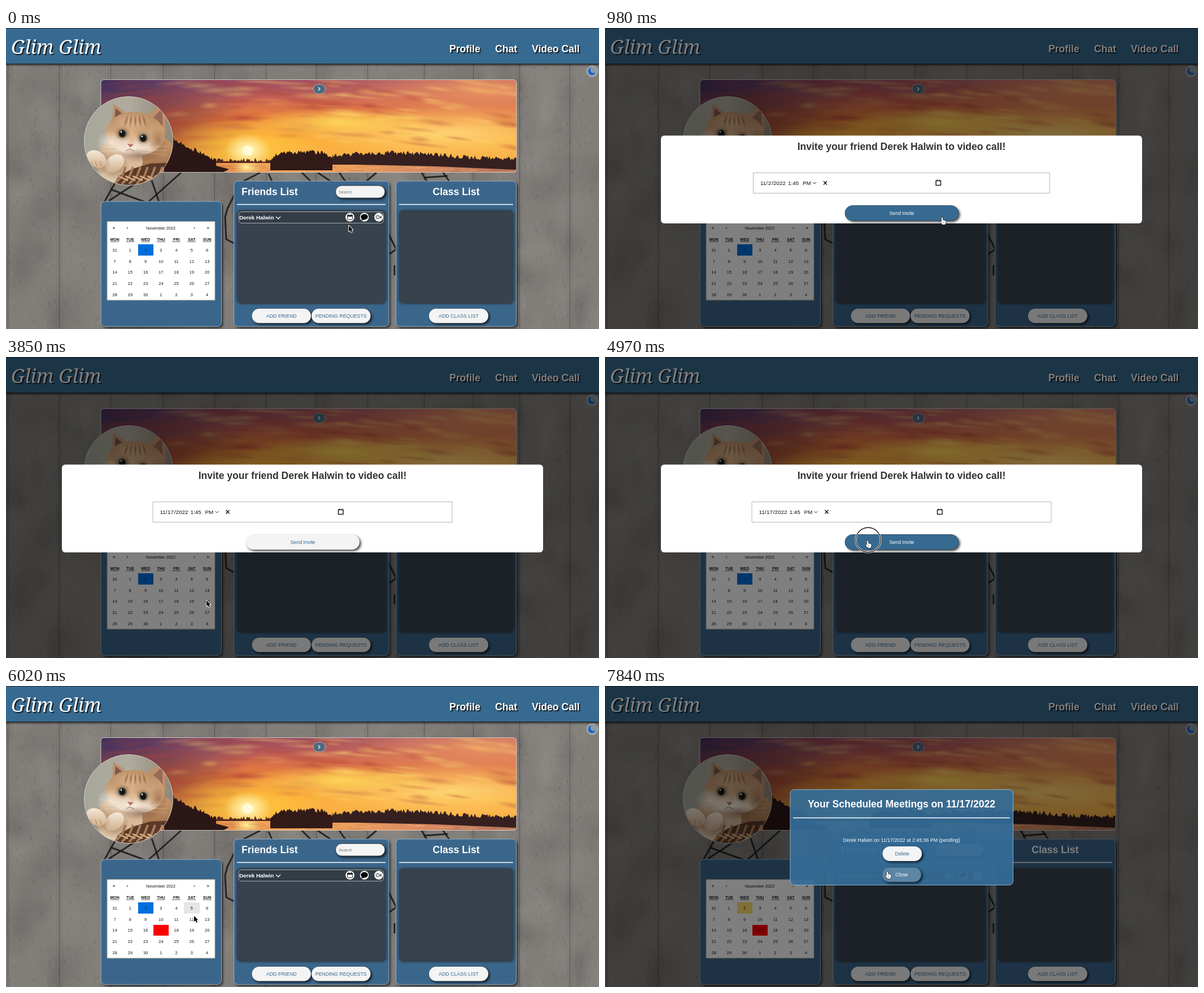
Recreate the animation shown at these times as an HTML page with a canvas. Size 1050 px wide and 533 px high, loop 7910 ms.

```html
<!DOCTYPE html>
<html lang="en">
<head>
<meta charset="utf-8">
<title>Glim Glim</title>
<style>
html, body { margin: 0; width: 100%; height: 100%; overflow: hidden; background: #777; }
canvas { display: block; }
</style>
</head>
<body>
<canvas id="stage" width="1050" height="533"></canvas>
<script>
const W = 1050, H = 533, LOOP = 7910, FRIEND = 'Derek Halwin';
const BLUE = '#376a90', PALE = '#f4f4f4', DARK = '#37424c';
const screen = document.getElementById('stage').getContext('2d');
const page = document.createElement('canvas');
page.width = W;
page.height = H;
let c = page.getContext('2d');

let seed = 11;
const rnd = (a = 0, b = 1) => a + (b - a) * (seed = seed * 16807 % 2147483647) / 2147483647;
const clamp = v => Math.max(0, Math.min(1, v));
const smooth = v => (v = clamp(v), v * v * (3 - 2 * v));
const within = (t, a, b) => t >= a && t < b;

function text(str, x, y, size, color, align = 'center', bold = false) {
  c.font = `${bold ? 'bold ' : ''}${size}px "Liberation Sans", Arial, sans-serif`;
  c.textAlign = align;
  c.fillStyle = color;
  c.fillText(str, x, y);
}
function shadow(color = 'transparent', d = 0, blur = 0) {
  c.shadowColor = color;
  c.shadowOffsetX = c.shadowOffsetY = d;
  c.shadowBlur = blur;
}
function box(x, y, w, h, r, fill, stroke, drop) {
  c.beginPath();
  c.roundRect(x, y, w, h, r);
  if (drop) shadow('rgba(0,0,0,.75)', 2.5, 4);
  c.fillStyle = fill;
  c.fill();
  shadow();
  if (stroke) {
    c.strokeStyle = stroke;
    c.lineWidth = 1;
    c.stroke();
  }
}
function shape(points, fill) {
  c.beginPath();
  for (let i = 0; i < points.length; i += 2) c.lineTo(points[i], points[i + 1]);
  c.closePath();
  c.fillStyle = fill;
  c.fill();
}
function line(points, color, width = 1) {
  c.beginPath();
  for (let i = 0; i < points.length; i += 2) c.lineTo(points[i], points[i + 1]);
  c.strokeStyle = color;
  c.lineWidth = width;
  c.stroke();
}
function oval(x, y, rx, ry, fill, angle = 0) {
  c.beginPath();
  c.ellipse(x, y, rx, ry, angle, 0, 7);
  c.fillStyle = fill;
  c.fill();
}
function gradient(x0, y0, x1, y1, colors) {
  const g = c.createLinearGradient(x0, y0, x1, y1);
  colors.forEach((col, i) => g.addColorStop(i / (colors.length - 1), col));
  return g;
}
function glow(x, y, rx, ry, rgb, alpha, angle = 0) {
  c.save();
  c.translate(x, y);
  c.rotate(angle);
  c.scale(rx, ry);
  const g = c.createRadialGradient(0, 0, 0, 0, 0, 1);
  g.addColorStop(0, `rgba(${rgb},${alpha})`);
  g.addColorStop(1, `rgba(${rgb},0)`);
  c.fillStyle = g;
  c.fillRect(-1, -1, 2, 2);
  c.restore();
}
function pill(label, x, y, w, h, hover = 0) {
  box(x, y, w, h, h / 2, PALE, null, true);
  if (hover) {
    c.globalAlpha *= hover;
    box(x, y, w, h, h / 2, BLUE, '#2c4f6b');
    c.globalAlpha /= hover;
  }
  text(label, x + w / 2, y + h / 2 + 3, 8.8, hover > .4 ? '#fff' : BLUE);
}

function drawWall() {
  c.fillStyle = '#817e7a';
  c.fillRect(0, 0, W, H);
  for (let i = 0; i < 220; i++)
    glow(rnd(0, W), rnd(60, H), rnd(15, 60), rnd(20, 80), rnd() < .5 ? '50,47,45' : '170,167,162', .13);
  for (let i = 0; i < 5000; i++) {
    c.fillStyle = rnd() < .5 ? 'rgba(40,38,36,.09)' : 'rgba(190,186,180,.08)';
    c.fillRect(rnd(0, W), rnd(60, H), rnd(1, 3), rnd(1, 7));
  }
  for (const x of [3, 94, 185, 278, 369, 460, 549, 640, 740, 827, 909, 998]) {
    glow(x, 300, 8, 380, '30,28,26', .08);
    line([x + .5, 60, x + .5, H], 'rgba(45,42,40,.4)');
  }
  [[204, 255, 174, 308], [250, 262, 182, 306], [258, 270, 271, 308], [310, 256, 252, 308],
   [186, 286, 246, 308], [450, 256, 415, 274, 392, 320, 388, 335, 390, 374, 405, 382],
   [465, 258, 472, 274], [524, 256, 542, 274], [552, 256, 577, 273], [590, 256, 602, 273],
   [636, 273, 656, 256], [676, 362, 691, 392, 676, 402], [688, 420, 688, 438],
   [736, 256, 746, 273], [774, 256, 786, 273], [740, 265, 782, 262]
  ].forEach(p => line(p, 'rgba(24,23,23,.85)', 3));
}

function trees(x0, x1, top, base, color) {
  const points = [x0, base];
  for (let x = x0; x <= x1; x += 2) points.push(x, top((x - x0) / (x1 - x0)) + rnd(-4, 4));
  shape([...points, x1, base], color);
}
function drawSunset() {
  c.save();
  c.beginPath();
  c.roundRect(168, 91.5, 736, 164, 6);
  c.clip();
  c.fillStyle = gradient(0, 91, 0, 236, ['#a8566a', '#cf6650', '#ec8439', '#fbac3c', '#f9b24a']);
  c.fillRect(168, 91, 736, 165);
  glow(170, 95, 290, 110, '52,44,94', .95);
  glow(215, 190, 230, 85, '120,40,48', .85);
  glow(500, 92, 260, 42, '140,64,88', .5);
  glow(850, 110, 290, 62, '236,150,98', .9);
  glow(790, 185, 260, 48, '255,216,120', .9);
  for (let i = 0; i < 130; i++) {
    const x = rnd(180, 910), y = rnd(95, 212), bright = rnd() < clamp((x - 150) / 500) * .65;
    glow(x, y, rnd(15, 60), rnd(3, 8), bright ? '255,218,110' : '176,66,56', x < 330 ? .25 : .36, (x - 428) / 2600);
  }
  glow(590, 168, 180, 26, '255,222,90', .85);
  glow(428, 210, 150, 50, '255,200,60', .9);
  glow(428, 217, 42, 30, '255,253,205', 1);
  oval(428, 217, 9, 9, '#fffbd8');
  c.fillStyle = gradient(168, 0, 904, 0, ['#8a4333', '#e08b4a', '#f2a456', '#dc8d63', '#b4745c']);
  c.fillRect(168, 236, 736, 20);
  glow(426, 246, 26, 14, '255,240,150', 1);
  for (let i = 0; i < 70; i++) {
    c.fillStyle = rnd() < .5 ? 'rgba(255,205,130,.4)' : 'rgba(120,60,45,.28)';
    c.fillRect(rnd(330, 900), rnd(240, 255), rnd(8, 35), 1);
  }
  trees(355, 475, () => 234, 239, '#54291f');
  trees(578, 904, u => 226 - 5 * Math.sin(u * 5), 242, '#35201f');
  shape([578, 239, 904, 239, 904, 251, 760, 245, 578, 241], '#35201f');
  trees(468, 578, u => 220 + 14 * Math.pow(Math.abs(2 * u - 1), 6), 252, '#321a18');
  trees(280, 372, u => 188 + 47 * u, 258, '#2b1716');
  shape([350, 238, 395, 250, 380, 258, 350, 258], '#2b1716');
  c.restore();
  box(168, 91.5, 736, 164, 6, 'transparent', 'rgba(225,220,215,.8)');
}

function drawCat() {
  c.save();
  c.beginPath();
  c.arc(217, 200, 78.5, 0, 7);
  c.clip();
  c.fillStyle = gradient(138, 0, 296, 0, ['#a5a79b', '#b0ab9d', '#8f8778']);
  c.fillRect(138, 120, 160, 160);
  oval(262, 236, 42, 46, gradient(0, 195, 0, 280, ['#c99a6c', '#8a5c3c']));
  oval(200, 236, 42, 38, gradient(0, 200, 0, 275, ['#c9a27c', '#e2cdb2']));
  shape([187, 182, 190, 134, 197, 139, 224, 158], '#bd8f6a');
  shape([192, 166, 194, 142, 212, 157], '#7d5447');
  shape([244, 158, 274, 137, 281, 134, 283, 186], '#bd8f6a');
  shape([259, 160, 277, 142, 277, 174], '#966a58');
  oval(229, 187, 52, 38, gradient(0, 150, 0, 226, ['#b98a61', '#cfa67e', '#ecdcc6']), .1);
  glow(222, 165, 34, 20, '232,200,165', .6);
  glow(186, 203, 26, 22, '246,236,220', .8);
  glow(222, 212, 40, 24, '248,238,224', .95);
  glow(270, 200, 18, 24, '150,98,60', .7);
  glow(236, 225, 40, 12, '110,72,48', .55);
  for (let i = -2; i < 3; i++) glow(229 + i * 8, 164, 3, 13, '140,88,52', .8, -i * .15);
  glow(223, 190, 10, 22, '226,180,140', .9);
  for (const [x, y] of [[206, 187], [243, 195]]) {
    glow(x, y, 14, 13, '90,64,44', .7);
    oval(x, y, 7.5, 7.5, '#5e5d49');
    oval(x, y, 5.2, 6, '#151515');
    oval(x - 2, y - 3, 1.4, 1.4, '#fff');
  }
  shape([215, 205, 226, 206, 220, 212], '#b87263');
  line([213, 217, 219, 214, 227, 218], '#8d6253');
  for (let i = 0; i < 3; i++) {
    line([208, 208 + i * 4, 165, 201 + i * 9], 'rgba(255,255,255,.4)', .6);
    line([238, 212 + i * 4, 285, 209 + i * 8], 'rgba(255,255,255,.4)', .6);
  }
  shape([188, 281, 200, 262, 222, 250, 255, 240, 300, 238, 300, 281], '#5a3928');
  for (let x = 192; x < 292; x += 13) line([x, 276, x + 14, 262, x + 20, 246], '#a97d58', 4);
  for (let x = 198; x < 292; x += 13) line([x, 262, x + 18, 270], '#d3ad84', 2.5);
  for (const [x, y, angle] of [[192, 240, -.7], [160, 232, .6]]) {
    glow(x, y + 6, 27, 24, '120,84,58', .6);
    oval(x, y, 19, 14, gradient(0, y - 14, 0, y + 14, ['#f2e6d4', '#d3b290']), angle);
  }
  for (let i = 0; i < 3; i++) line([150 + i * 8, 236, 153 + i * 8, 245], '#a98562');
  c.restore();
  c.beginPath();
  c.arc(217, 200, 78.5, 0, 7);
  c.strokeStyle = 'rgba(225,220,210,.85)';
  c.lineWidth = 1;
  c.stroke();
}

function drawPanel(x, y, w, h) {
  box(x, y, w, h, 7, 'rgba(60,105,143,.97)', 'rgba(180,205,222,.75)', true);
}
function drawInset(x, w) {
  shadow('rgba(30,38,46,.9)', 0, 4);
  box(x, 323, w, 165, 8, DARK);
  shadow();
}
function drawIcons() {
  for (const x of [609, 634.5, 660]) oval(x, 335, 7.8, 7.8, '#fff');
  box(604.5, 331.5, 9, 8, 1, '#fff', '#222');
  c.fillStyle = '#222';
  c.fillRect(604, 331, 10, 3);
  line([607, 329, 607, 332], '#222');
  line([611.5, 329, 611.5, 332], '#222');
  oval(634.5, 334.5, 6.3, 5, '#000');
  shape([630, 336, 629.5, 341, 635, 339], '#000');
  box(655.5, 332.5, 5.5, 5, 1, '#fff', '#222');
  shape([662, 335, 664.5, 332, 664.5, 338], '#222');
}

function drawPage() {
  drawWall();
  shadow('rgba(0,0,0,.9)', 2, 4);
  c.fillStyle = BLUE;
  c.fillRect(-5, 0, W + 10, 63);
  shadow();
  c.fillStyle = '#222e38';
  c.fillRect(0, 0, W, 1);
  shadow('rgba(20,20,20,.9)', 2, 1);
  c.font = 'italic 34px "Noto Serif", serif';
  c.fillStyle = '#fff';
  c.fillText('Glim Glim', 9, 46);
  text('Profile', 785, 42.5, 17.6, '#fff', 'left', true);
  text('Chat', 866, 42.5, 17.6, '#fff', 'left', true);
  text('Video Call', 931, 42.5, 17.6, '#fff', 'left', true);
  shadow();
  oval(1038, 76.5, 10, 10, '#b9c1c6');
  oval(1038, 76.5, 9, 9, '#8c9ba6');
  oval(1037.5, 76.5, 6.8, 6.8, '#1567c4');
  oval(1040.5, 74, 5.8, 5.8, '#8c9ba6');

  drawSunset();
  box(544, 99.5, 21.5, 17, 8.5, '#50697c', '#b5b2b0');
  line([553, 105, 556, 108, 553, 111], '#fff', 1.2);
  drawCat();

  drawPanel(168, 307, 213.5, 221.5);
  drawPanel(403.5, 271, 274.5, 257.5);
  drawPanel(690.5, 271, 213, 257.5);
  text('Friends List', 417, 296, 17.6, '#fff', 'left', true);
  text('Class List', 797, 296, 17.6, '#fff', 'center', true);
  line([409, 312.5, 672, 312.5], '#fff', 1.3);
  line([696, 312.5, 898, 312.5], '#fff', 1.3);
  box(583.5, 279, 87.5, 22, 11, PALE, '#2b3a46', true);
  text('Search', 589, 292.5, 7.5, '#777', 'left');
  drawInset(409, 264);
  drawInset(696, 203);
  box(412, 325.5, 256.5, 20, 5, '#333d46', '#a9b0b5');
  text(FRIEND, 413, 339, 9.8, '#fff', 'left', true);
  line([478, 334, 482, 338, 486, 334], '#fff', 1.3);
  drawIcons();
  pill('ADD FRIEND', 435.5, 497, 104.5, 25.5);
  pill('PENDING REQUESTS', 541, 497, 104.5, 25.5);
  pill('ADD CLASS LIST', 749, 497, 105, 25.5);
  box(179, 342.5, 191, 139.5, 0, '#fff', '#a0a096');
}

const WEEK = ['MON', 'TUE', 'WED', 'THU', 'FRI', 'SAT', 'SUN'];
const dayAt = (x, y, x0, cell) => {
  const col = Math.floor((x - x0) / cell), row = Math.floor((y - 383) / 19.7);
  return col >= 0 && col < 7 && row >= 0 && row < 5 ? row * 7 + col : -1;
};
function drawDays(x0, cell, fills, redText) {
  for (let i = 0; i < 35; i++) {
    const x = x0 + (i % 7) * cell, y = 383.3 + Math.floor(i / 7) * 19.7;
    if (fills[i]) {
      const left = Math.round(x), top = Math.round(y);
      c.fillStyle = fills[i];
      c.fillRect(left, top, Math.round(x + cell) - left, Math.round(y + 19.7) - top);
    }
    const color = i === 17 && redText ? redText : i === 2 && fills[2] === '#006edc' ? '#062a55' : '#111';
    text(i ? (i > 30 ? i - 30 : i) : 31, x + cell / 2, y + 12.5, 7.3, color);
  }
}
function drawArrows(xs, y) {
  [...'«‹›»'].forEach((mark, i) => text(mark, xs[i], y, 8.5, '#111'));
}
function drawCalendar(t) {
  drawArrows([191, 215, 333.5, 357.5], 357);
  text('November 2022', 274, 357, 7.3, '#111');
  WEEK.forEach((day, i) => {
    const x = 192.6 + i * 27.25;
    text(day, x, 377, 6.9, '#111', 'center', true);
    line([x - 7.5, 378.5, x + 7.5, 378.5], '#222', .7);
  });
  const fills = {}, booked = t > 5200, opened = t > 6350;
  if (within(t, 5700, 6500)) fills[dayAt(...cursorAt(t - 110), 179, 27.25)] = '#e6e6e6';
  fills[2] = opened ? '#ffe070' : '#006edc';
  if (booked) fills[17] = '#f00';
  drawDays(179, 27.25, fills, booked && (opened ? '#300' : '#b00'));
}
function drawPicker(t) {
  box(262.5, 303.5, 180, 211, 0, '#fff', '#b4b4b4');
  drawArrows([290, 321.5, 384, 416], 325);
  text('November', 357, 322, 7.3, '#111');
  text('2022', 353, 330, 7.3, '#111');
  WEEK.forEach((day, i) => {
    const x = 296 + i * 17.85;
    c.save();
    c.beginPath();
    c.rect(x, 358, 12.5, 14);
    c.clip();
    text(day, x, 369, 7, '#111', 'left', true);
    line([x, 370.5, x + 13, 370.5], '#222', .7);
    c.restore();
  });
  const fills = { [dayAt(...cursorAt(t - 110), 296, 16.3)]: '#e6e6e6' };
  fills[2] = '#006edc';
  drawDays(296, 16.3, fills);
}

function drawInvite(t) {
  box(99, 190.5, 852, 155.5, 6, '#fff');
  text(`Invite your friend ${FRIEND} to video call!`, 525, 216, 17.5, '#333', 'center', true);
  const changed = t > 3780, picking = within(t, 1820, 3780), d = changed ? 2.5 : 0;
  box(262.5 - d, 256.5, 525 + 2 * d, 36, 0, '#fff', '#b4b4b4');
  if (picking) box(288, 268.5, 7.5, 12.5, 2, '#cfe6fa', '#285f96');
  text('11/', 275 - d, 278, 9.9, '#111', 'left');
  text(changed ? '17' : '2', 291.5, 278, 9.9, '#111');
  text('/2022', 320 + d, 278, 9.9, '#111', 'right');
  text('1:45', 324 + d, 278, 9.9, '#111', 'left');
  text('PM', 350 + d, 278, 9.9, '#111', 'left');
  line([368 + d, 273, 371 + d, 276, 374 + d, 273], '#222');
  line([387 + d, 271, 393 + d, 277.5], '#111', 1.4);
  line([393 + d, 271, 387 + d, 277.5], '#111', 1.4);
  c.strokeStyle = '#111';
  c.lineWidth = 1.4;
  c.strokeRect(586 + d, 270.5, 8.5, 8);
  line([588 + d, 268.5, 588 + d, 271], '#111', 1.4);
  line([592.5 + d, 268.5, 592.5 + d, 271], '#111', 1.4);
  pill('Send Invite', 425, 314.5, 201, 26.5, t < 1120 || t > 4620 ? 1 : 0);
  if (picking) drawPicker(t);
}
function drawMeetings(t) {
  box(328, 183.5, 394.5, 169, 7, 'rgba(53,109,152,.92)', '#8fb0c8');
  text('Your Scheduled Meetings on 11/17/2022', 525, 215, 17.6, '#fff', 'center', true);
  line([333, 233.5, 717, 233.5], '#fff', 1.3);
  text(`${FRIEND} on 11/17/2022 at 2:45:36 PM (pending)`, 525, 276, 8.8, '#fff');
  pill('Delete', 491.5, 284, 69.5, 26);
  pill('Close', 490.5, 321, 69.5, 26, .8 * smooth((t - 7640) / 180));
}

// Pointer stops: time, x, y
const STOPS = [
  [0, 607, 350], [300, 609, 337], [860, 597, 335], [1000, 597, 335], [1620, 291, 272],
  [2310, 291, 272], [2660, 348, 390], [3080, 364, 432], [3200, 365, 431], [3500, 355, 431],
  [4270, 355, 431], [4860, 465, 325], [5450, 465, 325], [5900, 338, 394], [6020, 333, 407],
  [6300, 282, 430], [7070, 282, 430], [7760, 500, 328], [LOOP, 500, 328]
];
function cursorAt(t) {
  const i = Math.max(1, STOPS.findIndex(s => s[0] >= t));
  const [a, b] = [STOPS[i - 1], STOPS[i]], u = smooth((t - a[0]) / (b[0] - a[0]));
  return [a[1] + (b[1] - a[1]) * u, a[2] + (b[2] - a[2]) * u];
}
const ARROW = new Path2D('M0 0V10.5L2.4 8.2L4.2 12L6 11.2L4.3 7.5H7.4Z');
const HAND = new Path2D('M-1.2 7V1Q0-.7 1.2 1V5L5.5 6Q7 6.5 6.6 9L5.5 13H.2L-3.5 8.5Q-3.5 6.5-1.2 8Z');
function drawCursor(t) {
  const [x, y] = cursorAt(t);
  if ([300, 1700, 3620, 4900, 6300].some(click => within(t, click, click + 180))) {
    c.beginPath();
    c.arc(x + 1, y - 1, 22, 0, 7);
    c.strokeStyle = '#fff';
    c.lineWidth = 3;
    c.stroke();
    c.strokeStyle = '#111';
    c.lineWidth = 1.3;
    c.stroke();
  }
  const hand = within(t, 210, 1120) || within(t, 4700, 5300) || t > 7620;
  c.save();
  c.translate(x, y);
  c.lineJoin = 'round';
  c.strokeStyle = hand ? '#111' : '#fff';
  c.lineWidth = hand ? 1.2 : 1.8;
  c.fillStyle = hand ? '#fff' : '#000';
  c.stroke(hand ? HAND : ARROW);
  c.fill(hand ? HAND : ARROW);
  if (hand) line([1.5, 8, 1.5, 11], '#444', .7);
  c.restore();
}

function drawModal(alpha, draw, t) {
  if (!alpha) return;
  c.fillStyle = `rgba(0,0,0,${.5 * alpha})`;
  c.fillRect(0, 0, W, H);
  c.globalAlpha = alpha;
  draw(t);
  c.globalAlpha = 1;
}
function render(now) {
  const t = now % LOOP;
  c.drawImage(page, 0, 0);
  drawCalendar(t);
  drawModal(smooth((t - 400) / 300) * (1 - smooth((t - 5150) / 300)), drawInvite, t);
  drawModal(smooth((t - 6400) / 320), drawMeetings, t);
  drawCursor(t);
  requestAnimationFrame(render);
}

drawPage();
c = screen;
requestAnimationFrame(render);
</script>
</body>
</html>
```
